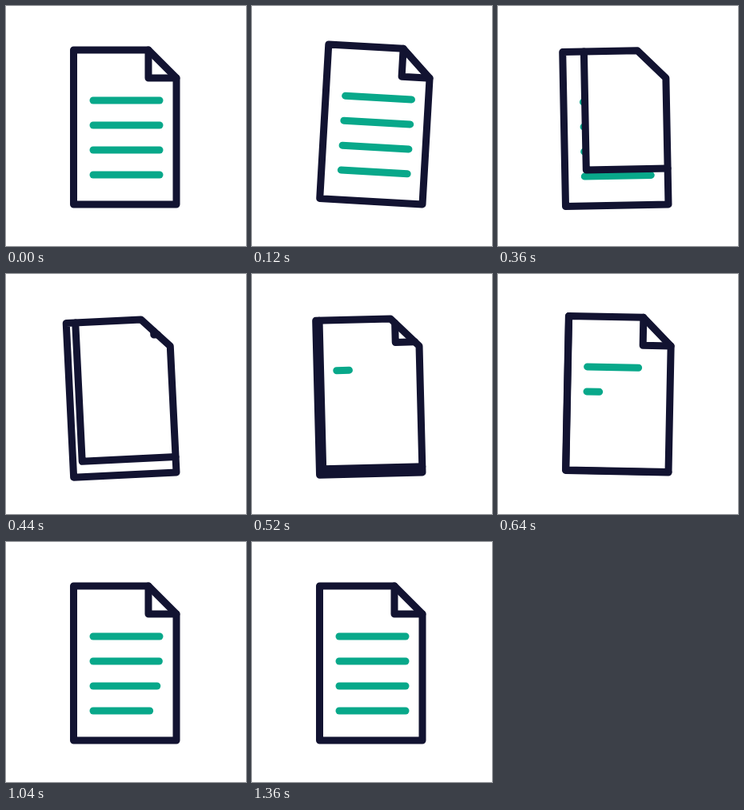
These frames come from a looping animation (300 by 300 pixels, 3960 ms). An HTML page with a canvas:

```html
<!DOCTYPE html>
<html lang="en">
<head>
<meta charset="utf-8">
<title>Document page turn</title>
<style>
  html, body { margin: 0; width: 100%; height: 100%; overflow: hidden; background: #fff; }
  canvas { display: block; width: 300px; height: 300px; }
</style>
</head>
<body>
<canvas id="stage"></canvas>
<script>
const LOOP = 3960, STEP = 40;
const INK = '#121331', TEAL = '#08a88a';
const L = 84.5, T = 55, R = 213, B = 248;
const CUT = 35, NX = R - CUT, NY = T + CUT;
const ROWS = [118, 149, 180, 211];
const X0 = 109, X1 = 192;
// [time, degrees] of the damped sway about the bottom right corner
const SWAY = [[0, 0], [250, 7], [402, -3], [712, 1.8], [905, 0]];

const canvas = document.getElementById('stage');
const ctx = canvas.getContext('2d');
const dpr = window.devicePixelRatio || 1;
canvas.width = canvas.height = 300 * dpr;

const clamp = v => Math.min(1, Math.max(0, v));
const mix = (a, b, k) => a + (b - a) * k;
const smooth = s => s * s * (3 - 2 * s);

function sway(t) {
  for (let i = 1; i < SWAY.length; i++) {
    const [t0, a] = SWAY[i - 1], [t1, b] = SWAY[i];
    if (t < t1) return mix(a, b, smooth((t - t0) / (t1 - t0)));
  }
  return 0;
}

// cubic-bezier(.37, 0, 0, 1), solved by bisection
function turnEase(x) {
  let lo = 0, hi = 1;
  for (let i = 0; i < 24; i++) {
    const u = (lo + hi) / 2;
    if (1.11 * (1 - u) * (1 - u) * u + u * u * u < x) lo = u; else hi = u;
  }
  return smooth(lo);
}

function grow(t) {
  if (t <= 0) return 0;
  return clamp((1 - Math.exp(-t / 96)) / (1 - Math.exp(-500 / 96)));
}

function path(points, close) {
  ctx.beginPath();
  points.forEach(p => ctx.lineTo(p[0], p[1]));
  if (close) ctx.closePath();
}

function stroke(color, points, close) {
  path(points, close);
  ctx.strokeStyle = color;
  ctx.stroke();
}

function fillWhite(points) {
  path(points, true);
  ctx.fillStyle = '#fff';
  ctx.fill();
}

function textLines(amount) {
  ROWS.forEach((y, i) => {
    const k = amount(i);
    if (k > 0) stroke(TEAL, [[X0, y], [mix(X0, X1, k), y]]);
  });
}

function draw(t) {
  ctx.setTransform(dpr, 0, 0, dpr, 0, 0);
  ctx.fillStyle = '#fff';
  ctx.fillRect(0, 0, 300, 300);
  ctx.lineWidth = 9;
  ctx.lineCap = ctx.lineJoin = 'round';

  ctx.translate(R, B);
  ctx.rotate(sway(t) * Math.PI / 180);
  ctx.translate(-R, -B);

  // old page, with its fold sweeping to the bottom left
  const turn = turnEase(clamp((t - 176) / 510));
  if (turn < 0.999) {
    const x = mix(NX, L, turn), y = mix(NY, B, turn);
    textLines(() => 1);
    fillWhite([[x, T], [NX, T], [R, NY], [R, y], [x, y]]);
    stroke(INK, [[x, T], [x, y], [R, y]]);
  }

  // new page
  textLines(i => grow(t - 500 - i * 120));
  stroke(INK, [[L, T], [NX, T], [R, NY], [R, B], [L, B]], true);
  const fold = smooth(clamp((t - 396) / 196));
  if (fold > 0) {
    const d = CUT / 2 * (1 - fold);
    const x = NX + d, y = NY - d;
    stroke(INK, [[x, T + d], [x, y], [R - d, y]]);
  }
}

function frame() {
  const t = performance.now() % LOOP;
  draw(Math.floor(t / STEP) * STEP);
  requestAnimationFrame(frame);
}
frame();
</script>
</body>
</html>
```
